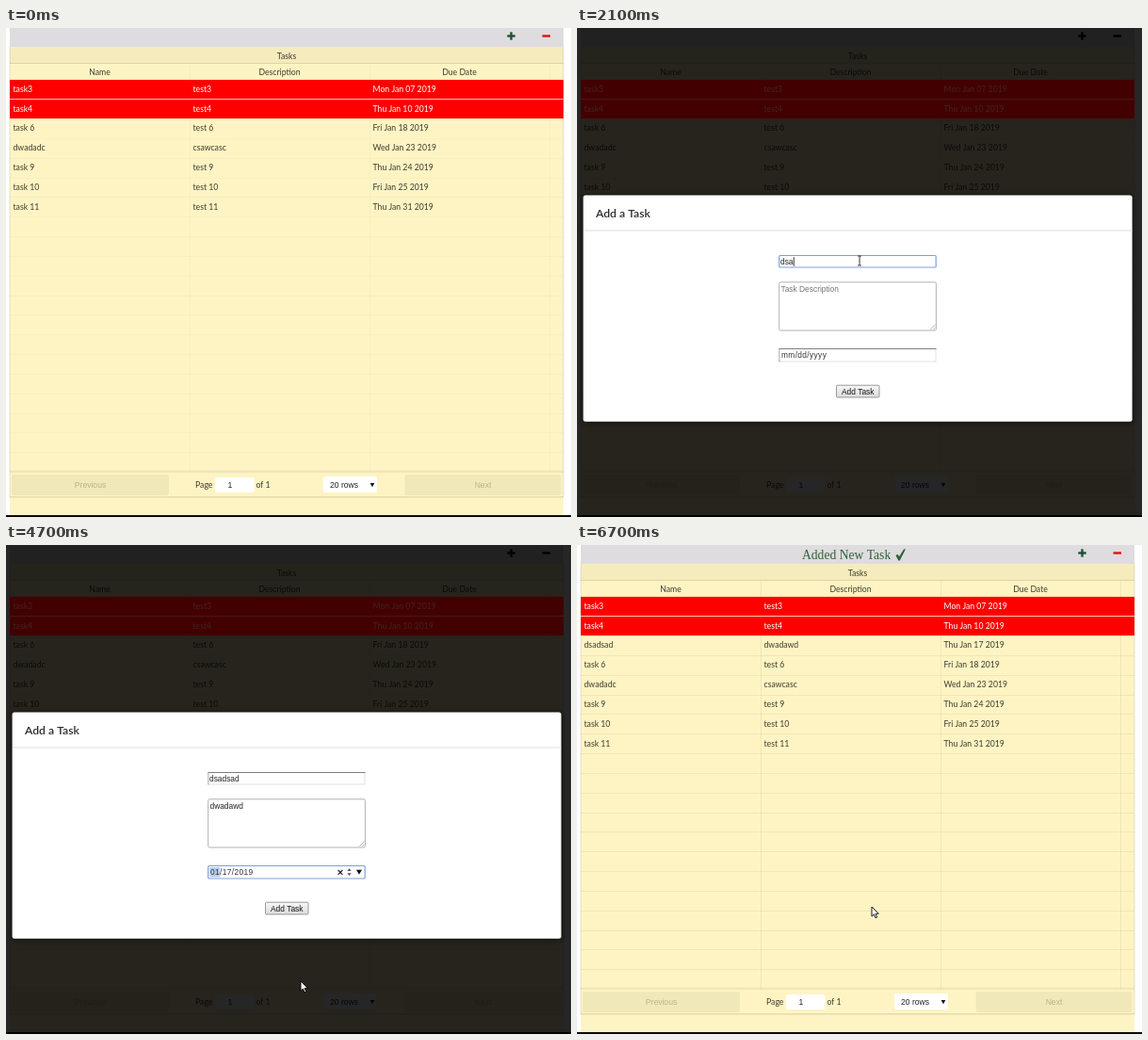
Write an HTML page with a canvas that moves like this. It is 600 px wide and 519 px high and loops after 7100 ms.

```html
<!DOCTYPE html>
<html lang="en">
<head>
<meta charset="utf-8">
<title>Task list</title>
<style>
html, body { margin: 0; width: 600px; height: 519px; overflow: hidden; background: #fff; }
canvas { display: block; }
</style>
</head>
<body>
<canvas id="stage" width="600" height="519"></canvas>
<script>
const c = document.getElementById('stage').getContext('2d');
const LOOP = 7100, STEP = 100;
const OPEN = 1000, CLOSE = 6200;
const ROW_TOP = 54.5, ROW_H = 20.83, COLS = [4, 195, 386, 577];
const LATO = 'Lato, sans-serif', ARIAL = '"Liberation Sans", Arial, sans-serif';
const TIMES = '"Liberation Serif", "Times New Roman", serif';
const INK = '#3f3b2e', FOCUS = '#7d9fdc';

const tasks = [
  ['task3', 'test3', 'Mon Jan 07 2019'],
  ['task4', 'test4', 'Thu Jan 10 2019'],
  ['task 6', 'test 6', 'Fri Jan 18 2019'],
  ['dwadadc', 'csawcasc', 'Wed Jan 23 2019'],
  ['task 9', 'test 9', 'Thu Jan 24 2019'],
  ['task 10', 'test 10', 'Fri Jan 25 2019'],
  ['task 11', 'test 11', 'Thu Jan 31 2019']
];
const added = ['dsadsad', 'dwadawd', 'Thu Jan 17 2019'];
const tasksAfter = [...tasks.slice(0, 2), added, ...tasks.slice(2)];

// pointer stops: time, x, y
const track = [
  [200, 612, 150], [700, 537, 12], [900, 535, 9], [1100, 535, 9],
  [1600, 300, 247], [2500, 300, 247], [2600, 300, 290], [2800, 300, 290],
  [3200, 354, 343], [3300, 354, 343], [3500, 373, 345], [3700, 373, 345],
  [4200, 313, 458], [4500, 313, 463], [5000, 313, 463], [5500, 313, 384]
];

const clamp = (v, lo, hi) => Math.min(hi, Math.max(lo, v));

function box(x, y, w, h, fill) {
  c.fillStyle = fill;
  c.fillRect(x, y, w, h);
}

function round(x, y, w, h, r, fill, stroke, width = 1) {
  c.beginPath();
  c.roundRect(x, y, w, h, r);
  if (fill) { c.fillStyle = fill; c.fill(); }
  if (stroke) { c.strokeStyle = stroke; c.lineWidth = width; c.stroke(); }
}

function text(s, x, y, font, fill = INK, align = 'left') {
  c.font = font;
  c.fillStyle = fill;
  c.textAlign = align;
  c.fillText(s, x, y);
}

function poly(points, fill, stroke, width = 1) {
  c.beginPath();
  for (let i = 0; i < points.length; i += 2) c.lineTo(points[i], points[i + 1]);
  c.closePath();
  if (fill) { c.fillStyle = fill; c.fill(); }
  if (stroke) { c.strokeStyle = stroke; c.lineWidth = width; c.stroke(); }
}

function triangle(x, y, w, h, fill = '#111') {
  poly([x - w / 2, y, x + w / 2, y, x, y + h], fill);
}

function toolbar(open, done) {
  box(4, 0, 588, 20, '#dedcdf');
  const green = open ? '#000' : '#1f5030';
  box(532.3, 7.3, 8.4, 2.4, green);
  box(535.3, 4.3, 2.4, 8.4, green);
  box(569.5, 7.3, 8.5, 2.4, open ? '#000' : '#e3120b');
  if (!done) return;
  const message = '#2f6136';
  text('Added New Task', 239, 15, '13.6px ' + TIMES, message);
  poly([338.5, 11.3, 340.3, 9.7, 342.2, 12.3, 347, 4.4, 349, 4.2, 342.8, 16.4, 341.4, 16.4], message);
}

function table(rows, sharp) {
  const lato = '8.7px ' + LATO, line = `rgba(90,70,0,${0.03 + 0.05 * sharp})`;
  box(4, 20, 588, 497, '#fef4c3');
  box(4, 20, 588, 18, 'rgba(0,0,0,.035)');
  box(4, 37, 588, 1, 'rgba(0,0,0,.1)');
  box(4, 53.5, 588, 1, 'rgba(0,0,0,.05)');
  text('Tasks', 298, 32.5, lato, INK, 'center');
  ['Name', 'Description', 'Due Date'].forEach((s, i) =>
    text(s, COLS[i] + 95.5, 49.7, lato, INK, 'center'));

  for (const x of COLS.slice(1)) box(x, 38, 1, 433, line);
  for (let i = 1; i < 20; i++) box(4, Math.round(ROW_TOP + i * ROW_H), 588, 1, line);
  box(4, 55, 588, 41, '#fe0000');
  box(4, 75, 588, 1, '#ffc9b8');
  rows.forEach((row, i) => row.forEach((s, k) =>
    text(s, COLS[k] + 3.5, ROW_TOP + i * ROW_H + 13.3, lato, i < 2 ? '#fff' : INK)));
  box(3.5, 20, 1, 478, 'rgba(0,0,0,.1)');
  box(591.5, 20, 1, 478, 'rgba(0,0,0,.1)');
}

function pager() {
  const lato = '8.7px ' + LATO, arial = '8.6px ' + ARIAL;
  box(4, 469.5, 588, 2.5, 'rgba(0,0,0,.06)');
  box(4, 497, 588, 1.5, 'rgba(0,0,0,.1)');
  for (const [s, x, w] of [['Previous', 6, 167], ['Next', 423.5, 166]]) {
    round(x, 474, w, 22, 2, 'rgba(0,0,0,.05)');
    text(s, x + w / 2, 488, arial, '#bab38f', 'center');
  }
  text('Page', 201, 488, lato);
  text('of 1', 265.5, 488, lato);
  round(222, 477, 41.5, 16, 2, '#fff');
  round(337, 476, 57, 17, 2, '#fff');
  text('1', 238, 488, arial, '#222', 'center');
  text('20 rows', 344, 488, arial, '#222');
  triangle(389, 483, 4.6, 4.2);
}

function field(y, h, focused) {
  if (focused) return round(214.7, y + 0.5, 166.5, h - 1, 1, '#fff', FOCUS, 1.2);
  box(214.5, y, 167, h, '#e2e2e2');
  box(214.5, y, 167, 1, '#808080');
  box(214.5, y, 1, h, '#999');
  box(215.5, y + 1, 165, h - 2, '#fff');
}

function entry(value, hint, x, y, focused) {
  const font = '8.4px ' + ARIAL;
  text(value || hint, x, y, font, value ? '#222' : '#757575');
  if (focused) box(x + c.measureText(value).width + 0.3, y - 7.5, 0.8, 9.5, '#000');
}

function dateField(t, focused) {
  const filled = t >= 4500;
  field(340, 14.5, focused);
  if (focused) box(216.5, 342, 10.5 + (filled ? 0 : 5), 10.5, '#b4cdf3');
  c.letterSpacing = '0.35px';
  text(filled ? '01/17/2019' : 'mm/dd/yyyy', 217, 350, '8.4px ' + ARIAL, '#333');
  c.letterSpacing = '0px';
  if (t < 3200 || t >= 5700) return;
  triangle(364.5, 346, 4.4, -2.8, '#555');
  triangle(364.5, 348.3, 4.4, 2.8, '#555');
  triangle(375, 344.8, 6, 5);
  if (!filled) return;
  c.beginPath();
  c.moveTo(352.6, 345); c.lineTo(357.4, 349.8);
  c.moveTo(357.4, 345); c.lineTo(352.6, 349.8);
  c.strokeStyle = '#222';
  c.lineWidth = 1.2;
  c.stroke();
}

function dialog(t) {
  const typed = (s, start, step) => s.slice(0, clamp(Math.floor((t - start) / step) + 1, 0, s.length));
  const onName = t >= 1700 && t < 2600, onNote = t >= 2600 && t < 3600, onDate = t >= 3600 && t < 5700;

  box(0, 0, 600, 519, 'rgba(0,0,0,.85)');
  box(4, 55, 588, 41, 'rgba(255,0,0,.13)');
  c.shadowColor = 'rgba(0,0,0,.6)';
  c.shadowBlur = 6;
  c.shadowOffsetY = 1;
  round(6.6, 177.6, 583, 240.2, 2.5, '#fff');
  c.shadowColor = 'transparent';
  box(7, 214.5, 582.5, 1, '#dedfe0');
  text('Add a Task', 20, 200.7, '600 12.2px ' + LATO, '#2b2b2b');

  field(241, 13.5, onName);
  entry(typed(added[0], 1900, 100), 'Task Name', 216, 250.7, onName);

  round(214.7, 269.8, 166.7, 51.2, 1.5, '#fff', onNote ? FOCUS : '#b2b2b2', onNote ? 1.2 : 1);
  c.beginPath();
  c.moveTo(375.5, 319.8); c.lineTo(380.5, 314.8);
  c.moveTo(378.5, 319.8); c.lineTo(380.5, 317.8);
  c.strokeStyle = '#888';
  c.lineWidth = 0.7;
  c.stroke();
  entry(typed(added[1], 2700, 83), 'Task Description', 216.5, 279.5, onNote);

  dateField(t, onDate);

  const shade = c.createLinearGradient(0, 379, 0, 392);
  shade.addColorStop(0, '#f8f8f8');
  shade.addColorStop(1, '#dcdcdc');
  round(275.5, 379.2, 45.5, 12.8, 1, shade, '#999');
  text('Add Task', 298.2, 388.6, '8.4px ' + ARIAL, '#111', 'center');
}

function pointerAt(t) {
  const next = track.findIndex(p => p[0] > t);
  if (next < 0) return track[track.length - 1].slice(1);
  const [t0, x0, y0] = track[next - 1], [t1, x1, y1] = track[next];
  const k = (t - t0) / (t1 - t0), e = k * k * (3 - 2 * k);
  return [x0 + (x1 - x0) * e, y0 + (y1 - y0) * e];
}

function hand() {
  c.beginPath();
  c.moveTo(2, 8.5);
  c.lineTo(2, 1.2);
  c.quadraticCurveTo(3.1, -0.6, 4.2, 1.2);
  c.lineTo(4.2, 5);
  c.lineTo(9, 6.2);
  c.quadraticCurveTo(10, 6.6, 9.9, 8);
  c.lineTo(9.3, 11.2);
  c.lineTo(8.4, 14);
  c.lineTo(3.6, 14);
  c.lineTo(0, 9);
  c.quadraticCurveTo(0.2, 7, 2, 8.5);
  c.closePath();
  c.fillStyle = '#fff';
  c.fill();
  c.strokeStyle = '#000';
  c.lineWidth = 0.9;
  c.stroke();
  for (const x of [5.4, 7.2]) box(x, 6.2, 0.6, 2.6, '#000');
}

function pointer(t) {
  if (t < track[0][0]) return;
  const [x, y] = pointerAt(t);
  const open = t >= OPEN && t < CLOSE;
  c.save();
  c.translate(x, y);
  if (!open && y < 16) hand();
  else if (open && x < 382 && ((y > 241 && y < 255) || (y > 269 && y < 321))) {
    box(-0.4, -5, 0.9, 10, '#222');
    box(-2, -5.4, 4, 0.8, '#222');
    box(-2, 4.6, 4, 0.8, '#222');
  } else {
    poly([0, 0, 0, 10.2, 2.4, 8, 4, 11.8, 5.7, 11, 4.1, 7.4, 7.3, 7.2], '#fff', '#000', 0.9);
  }
  c.restore();
}

function draw(t) {
  const done = t >= CLOSE, open = t >= OPEN && !done;
  box(0, 0, 600, 519, '#fff');
  toolbar(open, done);
  table(done ? tasksAfter : tasks, open ? 0 : clamp(t / 900, 0, 1));
  pager();
  box(0, 517, 600, 2, '#0a0a0a');
  if (open) dialog(t);
  pointer(t);
}

const start = performance.now();
function tick() {
  const t = (performance.now() - start) % LOOP;
  draw(Math.floor(t / STEP) * STEP);
  requestAnimationFrame(tick);
}
tick();
</script>
</body>
</html>
```
